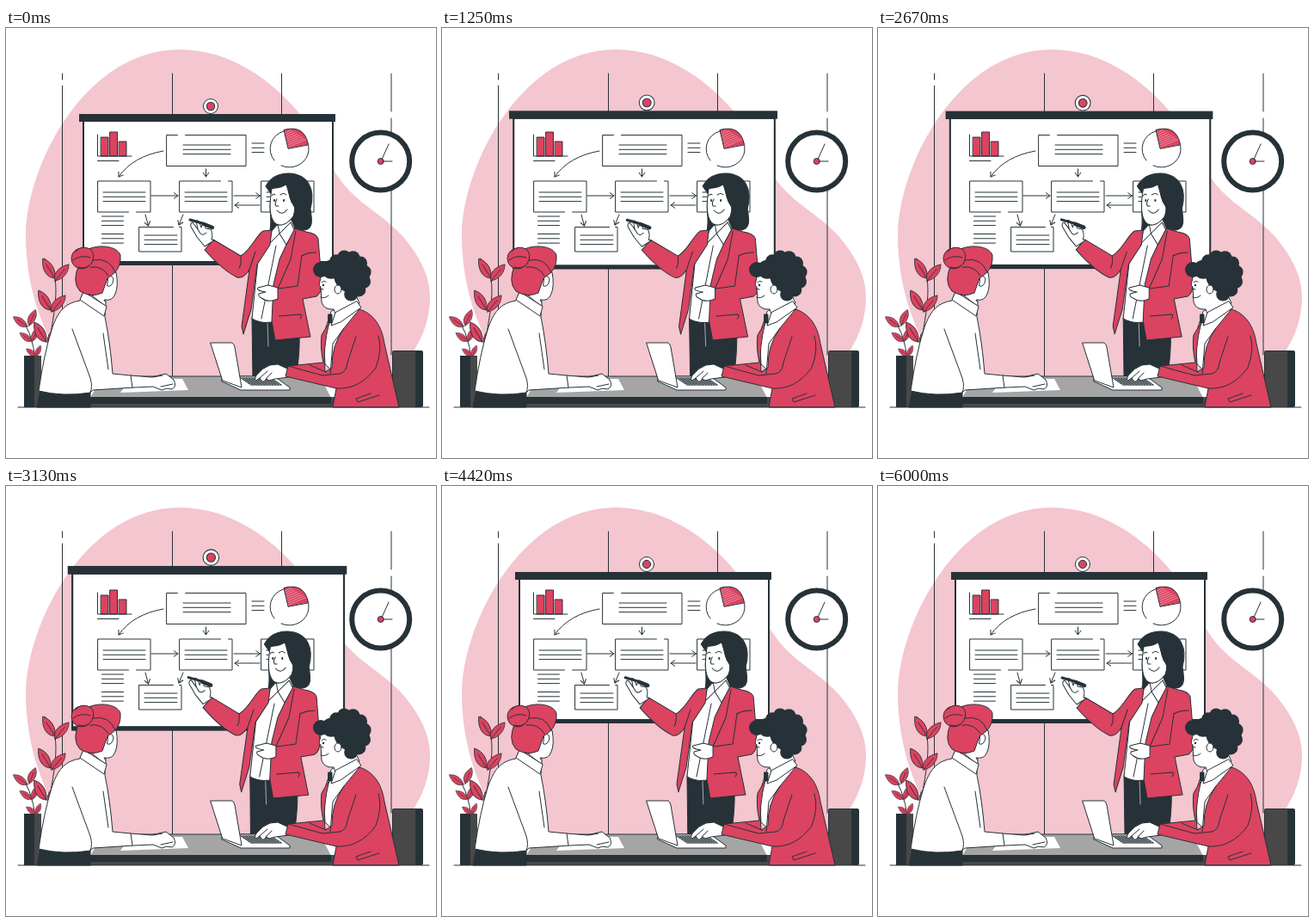
Recreate the animation shown at these times as an HTML page. Size 500 by 500 pixels, loop 6.04 s.

```html
<!DOCTYPE html>
<html lang="en">
<head>
<meta charset="utf-8">
<title>Team presentation</title>
<style>
  html, body { margin: 0; width: 100%; height: 100%; overflow: hidden; background: #fff; }
  svg { display: block; width: 100vw; height: 100vh; }
  .art { fill: none; stroke: #263238; stroke-linejoin: round; stroke-linecap: round; }
  .red { fill: #db4360; }
  .white { fill: #fff; }
  .dark { fill: #263238; }
  .grey { fill: #484848; }
  .flat { stroke: none; }
</style>
</head>
<body>
<svg viewBox="0 0 500 500">
<defs>
  <marker id="tip" viewBox="-6 -5 7 10" markerWidth="7" markerHeight="10" orient="auto">
    <path d="M-5 -3.5L0 0L-5 3.5" fill="none" stroke="#263238" stroke-linejoin="round"/>
  </marker>
</defs>
<g class="art">
  <path class="flat" fill="#f4c6cf" d="M202 25C262 25 310 62 341 99C362 125 372 156 392 181C412 206 440 218 462 243C482 266 493 290 493 312C493 345 480 375 450 405H75C40 350 23 300 23 240C24 160 92 25 202 25Z"/>
  <path d="M65.5 53V60M65.5 67V370M193.5 53V405M320.5 53V100M448 53V97M448 105V380"/>

  <!-- Clock -->
  <circle class="white" cx="435.7" cy="155" r="33.5" stroke-width="6"/>
  <path d="M445 135L436 155H449"/>
  <circle class="red" cx="435.7" cy="155" r="3.5"/>

  <g id="board">
    <circle class="white" cx="238" cy="91" r="8.5"/>
    <circle class="red" cx="238" cy="91" r="4.7"/>
    <rect class="white" x="90" y="108" width="290" height="165" stroke-width="2"/>
    <rect class="dark flat" x="85" y="100" width="298" height="9"/>
    <rect class="dark flat" x="89" y="271" width="292" height="5"/>
  </g>

  <!-- Charts -->
  <g id="bars"></g>
  <path d="M106.5 124V149H146M106.500 154.500H131"/>
  <path id="boxes"/>
  <path id="gaps" stroke="#fff" stroke-width="2.5"/>
  <path id="notes"/>
  <path d="M320 160A22.500 21.500 0 1 0 312 154"/>
  <path class="red" d="M328 140L323 118.500Q347 112 351.500 135.500Z"/>
  <path id="hatch" stroke="#f6bcc7" stroke-width=".6"/>
  <g marker-end="url(#tip)">
    <path d="M183 143C160 147 142 157 131 173"/>
    <path d="M232.500 164V173"/><path d="M169 195H200"/><path d="M265 195H295.500"/>
    <path d="M295 206H266"/><path d="M162 217L165.500 230"/><path d="M206 217L201 229"/>
  </g>

  <!-- Plant -->
  <path d="M44 410C46 370 62 325 57 291Q53 278 45 268M36 410Q35 365 21 342"/>
  <g id="leaves"></g>

  <!-- Standing woman -->
  <g id="speaker">
    <path class="dark" d="M286 337L287 410H337Q342 375 341 355L310 335Z"/>
    <path stroke="#fff" stroke-width=".6" d="M304 342L305 370"/>
    <path class="dark" d="M309 194C304 209 310 218 307 235H347C359 233 355 220 354 210C360 188 352 170 329 169Q310 169 302 184Z"/>
    <path class="white" d="M316 224L312 235L294 260L286 338Q296 344 309 342L325 270L336 233L331 221Z"/>
    <path class="white" d="M309 187C306 205 306 219 312 226C317 232 327 229 334 219Q338 207 332 202L326 182Z"/>
    <path class="dark flat" d="M302 184Q318 190 327 181Q328 199 335 208L343 207V177L324 170Z"/>
    <path d="M315 199Q312 204 314 207H317M309 195Q311 192 313 194M319 194Q323 191 326 194M315 212Q321 219 327 211"/>
    <path stroke-width="2" d="M312 200V201M323 200V201"/>
    <path class="white" d="M316 228L309 236L306 251L318 239L326 252L336 236L331 226L318 239Z"/>
    <path d="M314 253L297 338"/>
    <path class="red" d="M309 235L299 236C291 241 285 258 273 265L241 246L231 258Q252 282 269 290Q276 292 283 281L274 347L276 356L285 327L292 275L307 252Z"/>
    <path d="M273 265Q274 275 271 279M283 281L290 260"/>
    <path class="red" d="M336 233L349 237Q361 239 363 245L367 294Q368 307 361 312L345 315L354 359L313 363L309 341L311 298L318 269L326 252Z"/>
    <path d="M344 264L339 300L317 303M344 265Q350 261 361 261M337 236L331 269L316 303M317 335L342 333Q345 334 342 338"/>
    <path class="white" d="M316 302L305 299L293 302Q290 305 302 307L294 309Q293 312 297 314Q305 320 316 315Z"/>
    <path class="white" d="M231 254L222 243L215 231Q214 227 217 226L223 234L221 224Q224 222 227 232L229 226Q232 227 232 233L238 234Q241 239 239 246L242 247Z"/>
    <path stroke-width="3" d="M214 223L228 227"/>
    <path stroke-width="4.500" d="M230 228L240 232"/>
    <path d="M223 234L226 239Q229 242 233 238"/>
  </g>

  <!-- Chairs and table -->
  <rect class="dark flat" x="21" y="381" width="20" height="60"/>
  <rect class="grey flat" x="33" y="381" width="8" height="60"/>
  <rect class="dark flat" x="449" y="375" width="36" height="66" rx="2"/>
  <rect class="grey flat" x="450" y="376" width="26" height="65"/>
  <path class="flat" fill="#a5a5a5" d="M112 405H365L378 430H98Z"/>
  <path d="M112 405H365"/>
  <rect class="grey flat" x="98" y="429" width="286" height="12"/>
  <rect class="dark flat" x="98" y="429" width="280" height="8"/>
  <path class="white flat" d="M133 424L145 408H205L212 421Z"/>

  <!-- Seated woman -->
  <path class="dark" d="M40 421L36 441H98V421Z"/>
  <path class="white" d="M89 309L86 317C68 320 60 330 53 351Q44 380 38 422Q67 429 98 424L101 421L149 418L171 417L181 421Q186 418 193 420Q199 417 195 409L186 402L169 406L145 404L124 402Q121 365 115 336L116 315Z"/>
  <path d="M98 424Q101 417 98 407L77 350M113 355L119 397M145 404L147 418M171 406L182 404M180 417L194 414"/>
  <path class="white" d="M103 305L101 312L116 324Q117 319 114 316Q124 318 127 309Q131 300 128 284L116 282Z"/>
  <path class="white" d="M90 307L86 316L114 335L117 324Z"/>
  <path class="red" d="M85 275Q76 295 86 306Q99 314 112 308L118 291Q125 286 127 284Q134 276 133 264C129 253 107 251 94 258Z"/>
  <circle class="red" cx="88" cy="268" r="12"/>
  <path class="red" d="M81 260Q87 252 98 257Q105 264 99 274Q93 281 84 278"/>
  <path d="M78 270Q87 263 98 267M101 270Q120 266 127 284M98 278Q112 276 119 288"/>
  <path class="white" d="M119 290Q124 286 125 293Q123 302 118 300Z"/>

  <!-- Laptop -->
  <path class="white" d="M251 409L273 405H312L330 418V421H273L251 411Z"/>
  <path id="keys"/>
  <path class="white" d="M238 366H263Q265 367 266 371L274 418L252 410Z"/>

  <!-- Seated man -->
  <path class="white" d="M329 397L316 391L307 392Q298 395 291 404L289 409Q291 411 295 407L297 410Q299 413 303 408L306 410L313 408L329 406Z"/>
  <path d="M295 407L304 399M302 408L309 401"/>
  <path class="white" d="M378 330L369 357L371 391L385 404L412 327L394 319Z"/>
  <path class="red" d="M376 342L367 357Q365 371 369 389L328 393L325 405L384 419L380 441H457L440 367C437 346 427 332 411 327L393 349Q378 370 379 395L371 400Q368 372 376 342Z"/>
  <path d="M328 393L368 404L388 402Q396 400 397 389L407 359M384 419Q411 421 430 395Q438 374 433 358M372 400L353 392M424 425L407 431L409 435L434 427M393 349L380 367L377 402"/>
  <path class="white" d="M367 286L364 299L366 301L367 319Q370 328 381 327L383 333L411 320L397 290Z"/>
  <path class="white" d="M383 331L378 346L389 342L413 325L408 318Z"/>
  <rect class="dark" x="375" y="333" width="4" height="10"/>
  <g id="curls" class="dark flat"></g>
  <ellipse class="white" cx="386" cy="304" rx="4" ry="5"/>
  <path d="M367 296Q369 293 372 295M366 313Q371 315 375 311M365 303L369 304"/>
  <circle class="dark flat" cx="369" cy="299" r="1.200"/>
  <path d="M14 441H492"/>
</g>
</svg>
<script>
  const $ = id => document.getElementById(id);
  const repeat = (n, make) => Array.from({ length: n }, (_, i) => make(i)).join('');
  const path = (id, d) => $(id).setAttribute('d', d);
  const LOOP = 6040;

  // Flow chart: boxes with ruled text and a short break in the outline
  const box = (x, y, w, h) => `M${x} ${y}h${w}v${h}h${-w}z`;
  const lines = (x, y, w, gap = 5.3) => repeat(3, i => `M${x} ${y + i * gap}h${w}`);
  path('boxes', box(187, 124.5, 92, 36) + box(155, 231.5, 49, 28.5)
    + repeat(3, k => box(107 + 95 * k, 178, 61, 36)));
  path('gaps', 'M201 124.5h6M144 214h6M251 178h6M196 231.5h4');
  path('notes', lines(206, 136, 55) + lines(161, 241, 38) + lines(286, 134, 14)
    + repeat(3, k => lines(113 + 95 * k, 191, 49))
    + repeat(2, k => lines(111.5, 219 + 20.5 * k, 25)));

  $('bars').innerHTML = repeat(3, i => {
    const h = 28 - 6 * Math.abs(i - 1) - 5 * (i > 1);
    return `<rect class="red" x="${110.5 + 10.5 * i}" y="${149 - h}" width="8.5" height="${h}"/>`;
  });
  path('hatch', repeat(8, i => `M${325 + i * .5} ${122 + i * 2.3}L${331 + i * 2.5} ${118.5 + i * 1.6}`));
  path('keys', repeat(5, i => `M${273 + i * 3} ${407 + i * 2}h35`)
    + repeat(12, i => `M${273 + i * 3.2} 407l12 8`));

  const leaf = (x, y, size, angle) =>
    `<g transform="translate(${x} ${y}) rotate(${angle}) scale(${size})">` +
    '<path class="red" stroke-width=".03" d="M0 0C.2 -.3 .6 -.3 1 0C.7 .25 .3 .25 0 0ZM0 0H.7"/></g>';
  $('leaves').innerHTML = repeat(3, k =>
    leaf(57 - 5 * k, 291 + 37 * k, 27, -122) + leaf(57 - 4 * k, 294 + 36 * k, 25, -50)
    + leaf(25 + 5 * k, 347 + 17 * k, 20 - 3 * k, -146) + leaf(27 + 4 * k, 346 + 18 * k, 20 - 3 * k, -68));

  // Curly hair: a ring of round locks, open towards the face
  const lock = (x, y, r) => `<circle cx="${x}" cy="${y}" r="${r}"/>`;
  $('curls').innerHTML = lock(402, 287, 21) + lock(366, 281, 9) + repeat(9, i => {
    const a = -2.8 + i * .52;
    return lock(397 + 20 * Math.cos(a), 288 + 22 * Math.sin(a), i ? 8 : 11);
  });

  // Swell from 0 to 1 at the peak and back, eased on both sides
  const swell = (t, from, peak, to) => {
    const u = t < peak ? (t - from) / (peak - from) : (to - t) / (to - peak);
    const v = Math.max(0, u);
    return v * v * (3 - 2 * v);
  };
  const boardScale = t => 1 + .1 * (swell(t, 0, 600, 1850) + swell(t, 2400, 3000, 3640));

  // A sway that grows and dies away within the loop
  const sway = t => 4 * Math.sin(Math.PI * t / LOOP) * Math.cos(2 * Math.PI * (t - 1080) / 1240);

  const start = performance.now();
  const draw = () => {
    const t = (performance.now() - start) % LOOP;
    const d = sway(t);
    $('board').setAttribute('transform', `translate(234 179) scale(${boardScale(t)}) translate(-234 -179)`);
    $('speaker').setAttribute('transform', `translate(${d * .75} 0) rotate(${-d * .1} 320 200)`);
    requestAnimationFrame(draw);
  };
  draw();
</script>
</body>
</html>
```
